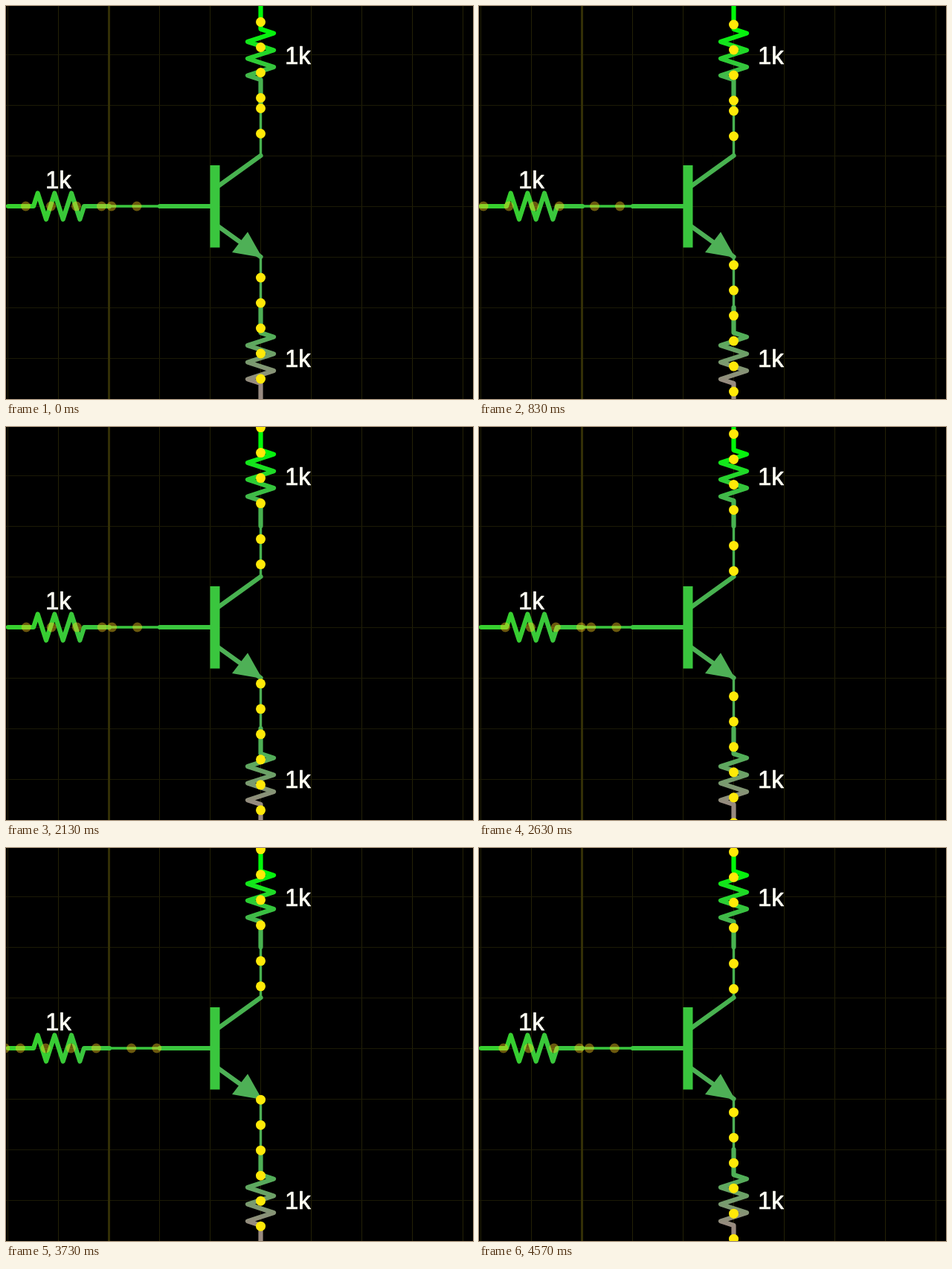
Animation, 628 px wide and 528 px high, one loop 4600 ms. Source, as an HTML page with a canvas:

```html
<!DOCTYPE html>
<html lang="en">
<head>
<meta charset="utf-8">
<title>Transistor circuit</title>
<style>
  html, body { margin: 0; height: 100%; overflow: hidden; background: #000; }
  canvas { display: block; }
</style>
</head>
<body>
<canvas width="628" height="528"></canvas>
<script>
const ctx = document.querySelector('canvas').getContext('2d');
const CELL = 68, GAP = 34, LOOP = 4600, FPS = 30;
const THICK = 6.2, THIN = 3.4;
const COLOR = {
  supply: '#00f808', collector: '#48b250', emitter: '#4eb056', ground: '#988a80',
  input: '#36d02e', base: '#3ac63e', dot: '#ffe908', dimDot: 'rgba(255,212,30,.42)'
};

// Dots advance by a fixed step per tick; emitter flow = base + collector.
const BASE_STEP = 0.543, COLLECTOR_STEP = 2.86;

function line(color, width, ...points) {
  ctx.strokeStyle = color;
  ctx.lineWidth = width;
  ctx.beginPath();
  points.forEach(([x, y]) => ctx.lineTo(x, y));
  ctx.stroke();
}

// Runs draw() with the x axis pointing along the part.
function along(x, y, vertical, draw) {
  ctx.save();
  ctx.translate(x, y);
  if (vertical) ctx.rotate(Math.PI / 2);
  draw();
  ctx.restore();
}

function resistor(x, y, vertical, from, to) {
  along(x, y, vertical, () => {
    const fade = ctx.createLinearGradient(GAP, 0, GAP + CELL, 0);
    fade.addColorStop(0, from);
    fade.addColorStop(1, to);
    const zigzag = Array.from({ length: 6 }, (_, i) =>
      [GAP + (2 * i + 1) * CELL / 12, i % 2 ? 17.5 : -17.5]);
    line(fade, THICK, [0, 0], [GAP, 0], ...zigzag, [GAP + CELL, 0], [2 * CELL, 0]);
  });
}

function dots(x, y, vertical, length, phase, color) {
  along(x, y, vertical, () => {
    ctx.fillStyle = color;
    for (let p = phase % GAP; p < length; p += GAP) {
      ctx.beginPath();
      ctx.arc(p, 0, 6.5, 0, 7);
      ctx.fill();
    }
  });
}

function grid() {
  for (let x = 3; x < 628; x += CELL) line('#232106', 1, [x - .5, 0], [x - .5, 528]);
  for (let y = 66; y < 528; y += CELL) line('#1b1a06', 1, [0, y - .5], [628, y - .5]);
  line('#332f06', 3, [138.5, 0], [138.5, 528]);
}

function transistor() {
  line(COLOR.base, THICK, [207, 269], [278, 269]);
  line(COLOR.collector, THICK, [284, 243], [342.5, 201]);
  line(COLOR.emitter, THICK, [284, 295], [342.5, 337]);
  ctx.fillStyle = COLOR.emitter;
  ctx.beginPath();
  ctx.moveTo(344.5, 338);
  ctx.lineTo(325, 303.5);
  ctx.lineTo(304, 331);
  ctx.fill();
  ctx.fillStyle = COLOR.base;
  ctx.fillRect(274.5, 214, 13, 110.5);
}

function label(x, y) {
  ctx.fillText('1k', x, y);
  ctx.strokeText('1k', x, y);
}

function draw(tick) {
  ctx.fillStyle = '#000';
  ctx.fillRect(0, 0, 628, 528);
  ctx.lineCap = ctx.lineJoin = 'round';
  grid();

  line(COLOR.input, THIN, [-65, 269], [3, 269]);
  line(COLOR.base, THIN, [139, 269], [207, 269]);
  line(COLOR.collector, THIN, [342.5, 133], [342.5, 201]);
  line(COLOR.emitter, THIN, [342.5, 337], [342.5, 405]);
  resistor(3, 269, false, COLOR.input, COLOR.base);
  resistor(342.5, -3, true, COLOR.supply, COLOR.collector);
  resistor(342.5, 405, true, COLOR.emitter, COLOR.ground);
  transistor();

  const base = 23.5 + BASE_STEP * tick;
  const collector = 24.5 + COLLECTOR_STEP * tick;
  const emitter = 28 + (BASE_STEP + COLLECTOR_STEP) * tick;
  dots(-65, 269, false, CELL, base + 13.4, COLOR.dimDot);
  dots(3, 269, false, 2 * CELL, base, COLOR.dimDot);
  dots(139, 269, false, CELL, base + 13.4, COLOR.dimDot);
  dots(342.5, -3, true, 2 * CELL, collector, COLOR.dot);
  dots(342.5, 133, true, CELL, collector + 14, COLOR.dot);
  dots(342.5, 337, true, 3 * CELL, emitter, COLOR.dot);

  ctx.fillStyle = ctx.strokeStyle = '#fffff4';
  ctx.lineWidth = .7;
  ctx.font = '33px "Liberation Sans", Arial, sans-serif';
  label(375, 78);
  label(53, 245);
  label(375, 485);
}

function animate() {
  const time = performance.now() % LOOP;
  draw(Math.floor((time + 5) * FPS / 1000) % (LOOP * FPS / 1000));
  requestAnimationFrame(animate);
}
animate();
</script>
</body>
</html>
```
